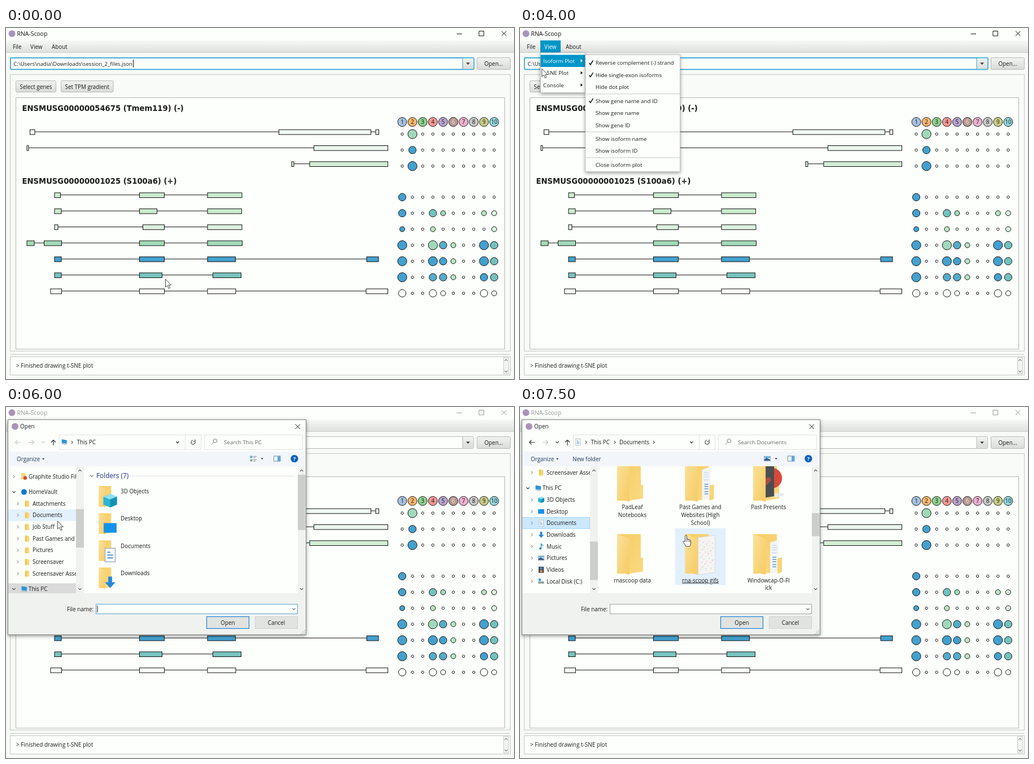
Write an HTML page that moves like this. It is 900 px wide and 622 px high and loops after 8 s.

```html
<!DOCTYPE html>
<html lang="en">
<head>
<meta charset="utf-8">
<title>RNA-Scoop</title>
<style>
html, body { margin: 0; width: 100%; height: 100%; overflow: hidden; background: #fdfffc }
svg { display: block; width: 900px; height: 622px }
text { font-family: "Open Sans", "Noto Sans", sans-serif; white-space: pre }
.h { font: bold 13.2px "DejaVu Sans", sans-serif }
</style>
</head>
<body>
<svg id="stage" viewBox="0 0 900 622">
<defs>
<linearGradient id="bar" x2="0" y2="1"><stop stop-color="#f7f9f6"/><stop offset="1" stop-color="#dee0dd"/></linearGradient>
<linearGradient id="btn" x2="0" y2="1"><stop stop-color="#f1f3f0"/><stop offset="1" stop-color="#d9dbd8"/></linearGradient>
<linearGradient id="fold" x2="1" y2="1"><stop stop-color="#f6cd66"/><stop offset="1" stop-color="#fbd97f"/></linearGradient>
<linearGradient id="flap" x2="1" y2="1"><stop stop-color="#fce19a"/><stop offset="1" stop-color="#f5cb64"/></linearGradient>
<filter id="shade" x="-10%" y="-10%" width="120%" height="125%"><feDropShadow dx="0" dy="2" stdDeviation="3" flood-opacity=".4"/></filter>
<clipPath id="tree"><path d="M4 105H124V330H4Z"/></clipPath>
<clipPath id="list"><path d="M138 105H517V330H138Z"/></clipPath>
</defs>
<g id="scene"></g>
</svg>
<script>
const INK = '#1b1c1b', BLUE = '#43a1cf', ACCENT = '#0096c9', WHITE = '#fdfffc';

// drawing helpers
const rect = (x, y, x2, y2, fill = 'none', stroke = 'none', more = '') =>
  `<rect x="${x}" y="${y}" width="${x2 - x}" height="${y2 - y}" fill="${fill}" stroke="${stroke}" ${more}/>`;
const path = (d, stroke = INK, w = 1, fill = 'none', more = '') =>
  `<path d="${d}" fill="${fill}" stroke="${stroke}" stroke-width="${w}" ${more}/>`;
const shape = (d, fill) => path(d, 'none', 0, fill);
const circle = (x, y, r, fill, stroke = 'none') =>
  `<circle cx="${x}" cy="${y}" r="${r}" fill="${fill}" stroke="${stroke}"/>`;
const text = (x, y, s, size = 9.9, fill = INK, more = '') =>
  `<text x="${x}" y="${y}" font-size="${size}" fill="${fill}" ${more}>${s}</text>`;
const mid = (x, y, s, size, fill, more = '') => text(x, y, s, size, fill, 'text-anchor="middle" ' + more);
const at = (x, y, body, s = 1) => `<g transform="translate(${x} ${y}) scale(${s})">${body}</g>`;
const DOWN = 0, RIGHT = -90, UP = 180;
const chev = (x, y, turn, color = '#555', w = 1.1) =>
  path('M-2.6-1.3L0 1.3L2.6-1.3', color, w, 'none', `transform="translate(${x} ${y}) rotate(${turn})"`);
const button = (x, y, x2, y2, s) =>
  rect(x, y, x2, y2, 'url(#btn)', '#b7b9b6', 'rx="2"') + mid((x + x2) / 2, y + 14.3, s);
const arrow = (x, y) => at(x, y,
  path('M0 0V14.2L3.3 11.2L5.7 16.6L8 15.6L5.6 10.4H10Z', '#333', .9, WHITE));

// isoform plot: row centre, fill, then exon edges
const genes = [
  [184.5, '#f1faf4', 42.5, 51, 483.5, 646.5, 655, 660.5],
  [212.8, '#ebf7ee', 37, 40, 545.5, 676.5],
  [241.2, '#d3efd6', 506, 510, 538, 676.5],
  [296.3, '#c9ebcd', 86, 96.5, 236.5, 280.5, 357, 418],
  [324.7, '#c9ebcd', 86, 98, 236.5, 267.5, 357, 417.5],
  [353, '#dbf1de', 86, 92, 242.5, 280.5, 357, 418],
  [381.4, '#a2dab8', 37, 50, 67.5, 98.5, 236.5, 280.5, 357, 418.5],
  [409.8, BLUE, 86, 98, 236.5, 280.5, 357, 406.5, 639, 660],
  [438.2, '#78c4bf', 86, 98, 236.5, 276.5, 366.5, 416.5],
  [466.6, WHITE, 79, 98.5, 236.5, 280.5, 357, 407, 638, 676.5]
];
// larger dots per row: column, size step, shade
const dots = ['13g', '12b', '13b', '02b', '02b 32t 41g 81l 91p', '01b 31l 91p',
  '03b 33g 42c 51l 83b 92t', '03b 33b 42b 51l 83b 92t', '03b 32c 42c 51l 82b 92t', '02w 32w 41w 82w 91w'];
const sizes = [2.2, 4.5, 6.6, 8.1];
const shades = { b: BLUE, c: '#55adca', t: '#73c2bf', g: '#a0d9b9', l: '#b8e4c2', p: '#dbf1de', w: WHITE };
const clusters = ['#a5bfe0', '#f7b66c', '#8ed08c', '#f49793', '#b7a3cf', '#b89890', '#edb0d0', '#c9cbc9', '#c9cd86', '#93d8e0'];
const colX = i => 702 + 18.1 * i;

function plot() {
  let out = text(28.5, 147, 'ENSMUSG00000054675 (Tmem119) (-)', 13.2, INK, 'class="h"') +
    text(28.5, 275.8, 'ENSMUSG00000001025 (S100a6) (+)', 13.2, INK, 'class="h"');
  clusters.forEach((c, i) => out += circle(colX(i), 166.5, 8, c, INK) +
    mid(colX(i), 170.1, i + 1, 10, i == 5 ? '#f4e8e4' : INK));
  genes.forEach(([y, fill, ...x], row) => {
    out += path(`M${x[0]} ${y - .5}H${x[x.length - 1]}`, '#111');
    for (let i = 0; i < x.length; i += 2) out += rect(x[i], y - 4.3, x[i + 1], y + 4.3, fill, '#111');
    const big = {};
    for (const [col, size, shade] of dots[row].split(' ')) big[col] = [sizes[size], shades[shade]];
    for (let i = 0; i < 10; i++) out += circle(colX(i), y + 3.5, ...(big[i] || [sizes[0], WHITE]), '#111');
  });
  return out;
}

function app(active) {
  const c = active ? '#111' : '#999', edge = active ? '#2ba5d4' : '#b7b9b6';
  return rect(0, 0, 900, 622, '#f8faf7') + rect(0, 0, 900, 22, WHITE) +
    circle(10.5, 10, 6, '#a994b8') + text(19.5, 13.8, 'RNA-Scoop', 10.4, c) +
    path('M798.5 10.5H808M838 5.5H846.5V14H838ZM878 5.5L886.5 14M886.5 5.5L878 14', c) +
    rect(0, 22, 900, 43, 'url(#bar)') + path('M0 43.5H900', '#cdcfcc') +
    text(12, 36.7, 'File') + text(43, 36.7, 'View') + text(81, 36.7, 'About') +
    (active ? rect(7.8, 52.8, 829, 73.3, WHITE, edge, 'stroke-width="1.7" rx="2"')
      : rect(7.5, 52.5, 828.5, 73.5, WHITE, edge, 'rx="2"')) +
    rect(809, 53.6, 828.2, 72.5, 'url(#btn)') + path('M809 53V73', edge) +
    shape('M815 61.3H822L818.5 65.3Z', '#444') +
    text(13.5, 66.7, 'C:\\Users\\nadia\\Downloads\\session_2_files.json', 9.65) + path('M225.5 56V70', '#111') +
    button(834.5, 52.5, 893.5, 73.5, 'Open...') +
    rect(7.5, 82.5, 893.5, 572.5, '#f9fbf8', '#c4c6c3') +
    button(17.5, 93.5, 88.5, 113.5, 'Select genes') + button(97.5, 93.5, 190, 113.5, 'Set TPM gradient') +
    rect(17.5, 123.5, 883.5, 569, WHITE, '#b2b4b1') + plot() +
    path('M8 578.5H893', '#c4c6c3') +
    rect(7.5, 582.5, 893.5, 615, WHITE, '#c4c6c3') + rect(881.5, 584, 890.5, 613, '#f1f3f0', '#c9cbc8') +
    chev(886, 588.5, UP, '#777') + chev(886, 608.5, DOWN, '#777') +
    text(18, 602.3, '&gt; Finished drawing t-SNE plot', 10);
}

// menus
const popup = (x, y, x2, y2) => rect(x, y, x2, y2, WHITE, '#c3c5c2', 'filter="url(#shade)"');
const label = (x, x2, s, tx) => rect(x, 22, x2, 43.5, ACCENT) + text(tx, 36.7, s, 9.9, '#fff');

function viewMenu(sub) {
  let out = label(36, 72, 'View', 43) + popup(36.5, 44, 115.5, 114.5);
  if (sub) out += rect(36.5, 47.5, 115.5, 69, ACCENT);
  ['Isoform Plot', 't-SNE Plot', 'Console'].forEach((s, i) => {
    const y = 58 + 21.5 * i, c = sub && !i ? '#fff' : INK;
    out += text(41, y + 3.7, s, 9.8, c) + shape(`M107.5 ${y - 3}L111 ${y}L107.5 ${y + 3}Z`, c);
  });
  if (!sub) return out;
  out += popup(116, 47.5, 283.5, 254.5);
  const items = ['*Reverse complement (-) strand', '*Hide single-exon isoforms', 'Hide dot plot', '',
    '*Show gene name and ID', 'Show gene name', 'Show gene ID', '', 'Show isoform name', 'Show isoform ID', '', 'Close isoform plot'];
  let y = 61.5;
  for (const s of items) {
    if (!s) { out += path(`M117 ${y - 9.5}H283`, '#c8cac7'); y += 2.5; continue; }
    if (s[0] == '*') out += path(`M122.5 ${y + .5}L124.8 ${y + 3.5}L129.5 ${y - 4}`, INK, 1.6);
    out += text(133.7, y + 3.7, s.replace('*', ''), 9.75);
    y += 21.6;
  }
  return out;
}

function fileMenu(open, hover) {
  let out = label(5, 34, 'File', 12);
  if (!open) return out;
  out += popup(5.5, 44, 119.5, 114.5);
  if (hover) out += rect(5.5, 68.5, 119.5, 90, ACCENT);
  ['Save session', 'Load previous session', 'Reset session'].forEach((s, i) =>
    out += text(10.5, 61.7 + 21.5 * i, s, 9.7, hover && i == 1 ? '#fff' : INK));
  return out;
}

// small icons, centred on 0,0
const icons = {
  folder: shape('M-4-6H1L4-4V6H-4Z', '#fbd671') + shape('M-4-6L-1-4V6H-4Z', '#f3c14f'),
  red: shape('M-5-6H0L3-4V5H-5Z', '#fbd671') + circle(2, 2.5, 3.2, '#d9453a'),
  blue: circle(0, 0, 5, '#1179d0'),
  pc: shape('M-4.5-5L5-3.5V3L-4.5 2Z', '#2c93dc') + shape('M-6 3.5L3 5L6 3.8L-3 2.5Z', '#9fb4c2'),
  cube: shape('M0-6L6-3.5V3.5L0 6L-6 3.5V-3.5Z', '#2bb5d3') + shape('M0-6L6-3.5L0-1L-6-3.5Z', '#8ee0ee') + shape('M0-1L6-3.5V3.5L0 6Z', '#1391b4'),
  desk: rect(-6, -4.5, 6, 4.5, '#1492ea'),
  doc: rect(-4.5, -6, 4.5, 6, '#f8fafc', '#a9b5bf', 'stroke-width=".8"') + path('M-2.5-2.5H0M-2.5 0H2.5M-2.5 2.5H2.5', '#3388c8', .9),
  down: shape('M-2-6H2V0H5.5L0 6L-5.5 0H-2Z', '#2388e0'),
  note: path('M0 4V-6Q1-3 4-1.5', '#1a86d8', 1.4) + circle(-1.5, 4, 2.2, '#1a86d8'),
  pic: rect(-6, -4.5, 6, 4.5, '#d8ecf8', '#9aa9b4', 'stroke-width=".8"') + shape('M-5.5 4V1L-1-1.5L5.5 2V4Z', '#34618a') + shape('M-5.5-4H5.5V-1.5H-5.5Z', '#61aee6'),
  film: rect(-5, -6, 5, 6, '#3a3d43') + rect(-2.8, -5, 2.8, -.6, '#4a86c5') + rect(-2.8, .6, 2.8, 5, '#c48b4a'),
  disk: shape('M-6 0H5L6 4.5H-6Z', '#9ba3a8') + rect(-5, -5.5, -.5, -1, '#1d9be8') + rect(2, 2, 4.5, 3.2, '#46c35a')
};
const icon = (k, x, y, s) => at(x, y, icons[k], s);

// what sticks out of a large folder, 52 x 72
const extras = {
  '': '',
  docs: shape('M31 15L46 10V67L31 70Z', '#f2f5f8') + path('M35 41H42M35 45H42M35 49H42M35 54H42M35 58H42', '#5b9bd0', 1.6) +
    path('M34 20H43M34 24H43M34 28H43M34 33H43', '#b9cfe0', 1) + shape('M44 43L52 41V67L44 70Z', '#f9d577'),
  page: shape('M14 7H44L52 15V66L14 67Z', '#f5f7f9') + path('M14 7H44L52 15V66L14 67Z', '#cfd4d8', .8) + shape('M37 12L46 23H37Z', '#cfd8e0'),
  photo: circle(34, 30, 18, '#d9483b') + shape('M15 2L38 4V62L15 66Z', '#4b4e51') + shape('M19 32L30 28L34 34L23 44Z', '#a64a45') + shape('M39 57H55V61L39 65Z', '#e8eaec'),
  prints: shape('M24 6L54 2V68L24 72Z', '#f5f4f2') + path('M24 6L54 2V68L24 72Z', '#ccd', .6) +
    Array.from({ length: 40 }, (_, i) => circle(27 + i * 7.3 % 25, 12 + i * 11.7 % 52, .9, ['#ebbcc6', '#bcd9ba', '#e6d0d2'][i % 3])).join('')
};
const folder = (x, y, extra = '', s = 1) => at(x, y,
  shape('M1 0H41Q43 0 43 2V42H47V66L22 70H1Z', 'url(#fold)') + extras[extra] +
  shape('M1 0L21 7Q23 8 23 10V72L2 66Q1 66 1 64Z', 'url(#flap)'), s);

const row = (y, s, k, level = 1, open) =>
  chev(level ? 21 : 14, y, open ? DOWN : RIGHT, open ? '#333' : '#999') +
  icon(k, level ? 37.5 : 32, y, level ? .9 : 1) + text(level ? 47 : 40, y + 3.6, s, 9.9);

function treeTop() {
  let out = rect(4, 181.5, 124, 202, '#e2f1fc') + rect(4, 312.5, 124, 330, '#d9dad9') +
    row(123.3, 'Graphite Studio Files', 'red', 0) + row(150.6, 'HomeVault', 'blue', 0, true);
  ['Attachments', 'Documents', 'Job Stuff', 'Past Games and Websites', 'Pictures', 'Screensaver', 'Screensaver Assets']
    .forEach((s, i) => out += row(171.2 + 20.67 * i, s, 'folder'));
  return out + row(322.5, 'This PC', 'pc', 0, true);
}

function treeEnd(picked) {
  let out = (picked ? rect(3.5, 195.5, 123.5, 215.5, '#cce8fd', '#a3d4fa') : rect(4, 133.5, 124, 154, '#d9dad9')) +
    row(116, 'Screensaver Assets', 'folder') + row(143.8, 'This PC', 'pc', 0, true);
  [['3D Objects', 'cube'], ['Desktop', 'desk'], ['Documents', 'doc'], ['Downloads', 'down'], ['Music', 'note'],
    ['Pictures', 'pic'], ['Videos', 'film'], ['Local Disk (C:)', 'disk']]
    .forEach(([s, k], i) => out += row(164.5 + 20.65 * i, s, k));
  return out;
}

function drives() {
  let out = chev(152, 122, DOWN, '#666') + text(160, 126.2, 'Folders (7)', 11.8, '#1f3287') + path('M223 122.5H510', '#dfe2ea');
  [['3D Objects', 'cube', 2], ['Desktop', 'desk', 1.9], ['Documents', 'doc', 2], ['Downloads', 'down', 1.7]].forEach(([s, k, size], i) => {
    const y = 140 + 48.2 * i;
    out += folder(164, y, '', .52) + icon(k, 184.5, y + 26, size) + text(203, y + 13.2, s);
  });
  return out;
}

function grid(top, step, cells, hover) {
  let out = '';
  cells.forEach(([name, extra], i) => {
    const x = 199 + 120.6 * (i % 3), y = top + step * (i / 3 | 0), on = i == hover;
    if (on) out += rect(x - 45, y - 10.5, x + 45, y + 90, '#e2f0fc');
    out += folder(x - 28, y, extra);
    name.split('|').forEach((s, n) =>
      out += mid(x, y + 85.2 + 13.9 * n, s, 9.9, INK, on ? 'text-decoration="underline"' : ''));
  });
  return out;
}

const documents = () => grid(121, 115.3, [['LessonRecorders', 'docs'], ['LessonRecorders|Templates', 'page'], ['Tilro', 'docs'],
  ['Custom Office|Templates', ''], ['Downloads', ''], ['Fax', 'docs']]);
const scrolled = () => grid(96, 129.3, [['PadLeaf|Notebooks', ''], ['Past Games and|Websites (High|School)', 'docs'], ['Past Presents', 'photo'],
  ['rnascoop data', ''], ['rna-scoop gifs', 'prints'], ['Windowcap-O-Fl|ick', 'docs']], 4);

const scrollbar = (x, x2, from, to) => rect(x, 105, x2, 330, '#f0f2ef') + rect(x, from, x2, to, '#cccecb') +
  chev((x + x2) / 2, 112.5, UP, '#444') + chev((x + x2) / 2, 322.5, DOWN, '#444');

function dialog({ place, mark, tail, tree, thumb, list, range }) {
  const on = place ? '#333' : '#c4c6c4';
  let out = rect(3.5, 22.5, 531.5, 403.5, WHITE, '#858785', 'filter="url(#shade)"') +
    circle(16, 34.5, 6, '#a994b8') + text(25, 38.4, 'Open', 10) + path('M512.5 30.5L521 39M521 30.5L512.5 39', '#111') +
    path('M26 62.5H16.5M20.5 58.5L16.5 62.5L20.5 66.5', on, 1.2) + path('M40 62.5H49.5M45.5 58.5L49.5 62.5L45.5 66.5', '#c4c6c4', 1.2) +
    chev(66, 62.5, DOWN, on) + path('M84 68V58.5M80 62.5L84 58.5L88 62.5', '#333', 1.2) +
    rect(94.5, 49.5, 317.5, 75.5, 'none', '#e1e3e0') + rect(317.5, 49.5, 345.5, 75.5, 'none', '#e1e3e0') +
    rect(351.5, 49.5, 525.5, 75.5, 'none', '#e1e3e0') +
    icon(mark, 103, 62, .95) + chev(117, 62.5, RIGHT) + text(125.5, 66.4, 'This PC') +
    chev(304, 62.5, DOWN, '#444', 1.3) + path('M334.7 60.5A3.7 3.7 0 1 1 331 58.8M335 57.5V61H331.5', '#444', 1.1) +
    path('M367.8 62.5L363.5 67M373.7 60A3.3 3.3 0 1 1 367.1 60A3.3 3.3 0 1 1 373.7 60', '#777') +
    text(386, 66.4, 'Search ' + (place || 'This PC'), 9.85, '#666');
  if (place) out += chev(168, 62.5, RIGHT) + text(176, 66.4, place);
  if (tail) out += chev(237, 62.5, RIGHT);
  out += rect(4, 79, 531, 105, '#f2f6fa') + text(19, 95.6, 'Organize', 9.9, '#1e395b') + shape('M64 91H68.5L66.2 93.5Z', '#1e395b') +
    (place ? text(93, 95.6, 'New folder', 9.9, '#1e395b') + icon('pic', 438, 91.5, .95)
      : rect(432.5, 86.5, 436.5, 90.5, '#6a9fcf') + rect(432.5, 92.5, 436.5, 96.5, '#7cae82') + path('M438 87.5H444M438 90H442M438 93.5H444M438 96H442', '#888')) +
    shape('M451.5 90.5H456L453.7 93Z', '#333') +
    rect(474.5, 87, 486, 96, '#fff', '#5d8ab8') + rect(481, 87, 486, 96, '#5ea6e2') +
    circle(511, 91.5, 6.6, '#0a63ba') + mid(511, 95, '?', 9.5, '#fff', 'font-weight="bold"') +
    `<g clip-path="url(#tree)">${tree}</g><g clip-path="url(#list)">${list}</g>` +
    scrollbar(124, 138, thumb, thumb + 68) + scrollbar(517, 530.5, ...range) +
    rect(4, 330, 531, 403, '#f0f2ef') + text(108, 361.8, 'File name:') +
    rect(159.5, 349.5, 516.5, 366.5, WHITE, place ? '#a0a3a0' : '#5c9fd6') + chev(510, 358, DOWN, '#555') +
    (place ? '' : path('M162 352V364', '#111')) +
    rect(355.5, 371.5, 430.5, 392.5, '#e1e3e0', '#1c84d8', 'stroke-width="1.2"') + mid(393, 386.3, 'Open') +
    rect(441.5, 371.5, 516.5, 392.5, '#e1e3e0', '#d0d2cf') + mid(479, 386.3, 'Cancel');
  for (const [x, y] of [[528, 395], [525, 398], [528, 398], [522, 401], [525, 401], [528, 401]])
    out += rect(x, y, x + 1.6, y + 1.6, '#b5b7b4');
  return out;
}

const hand = at(288.5, 227, path('M4 12V2Q4 0 5.5 0T7 2V8Q7 6.5 8.5 6.8T9.8 8.5Q10 7.3 11.2 7.6T12.3 9.2Q13.8 8.3 14 10.5V14Q14 17 12 20H5.5Q4 16.5.5 12.5Q0 10.5 2 10.8Z', '#333', .9, WHITE) +
  path('M7 8V12M9.7 8.5V12M12.2 9.5V12.5', '#333', .8));

// one entry per half second
const home = { mark: 'pc', list: drives(), range: [120, 218] };
const steps = [
  [arrow(282.5, 445)], [arrow(104, 262)], [arrow(52, 67)],
  [viewMenu(false), arrow(54.5, 29)],
  ...Array(4).fill([viewMenu(true), arrow(65, 56)]),
  [viewMenu(true), arrow(38.8, 72)],
  [fileMenu(false), arrow(20, 39.5)], [fileMenu(true), arrow(20, 39.5)],
  [fileMenu(true, true), arrow(20, 80)],
  [dialog({ ...home, tree: treeTop(), thumb: 181 }), arrow(91.3, 202)],
  [dialog({ ...home, tree: treeEnd(false), thumb: 238.5 }), arrow(159, 213)],
  [dialog({ place: 'Downloads', mark: 'down', tree: treeEnd(true), thumb: 238.5, list: documents(), range: [120, 161] }), arrow(152.5, 213)],
  [dialog({ place: 'Documents', mark: 'doc', tail: true, tree: treeEnd(true), thumb: 238.5, list: scrolled(), range: [188, 229] }), hand]
];

const scene = document.getElementById('scene');
let shown = -1;
function tick() {
  const i = Math.floor(performance.now() % 8000 / 500);
  if (i != shown) scene.innerHTML = app(i < 12) + steps[shown = i].join('');
  requestAnimationFrame(tick);
}
tick();
</script>
</body>
</html>
```
